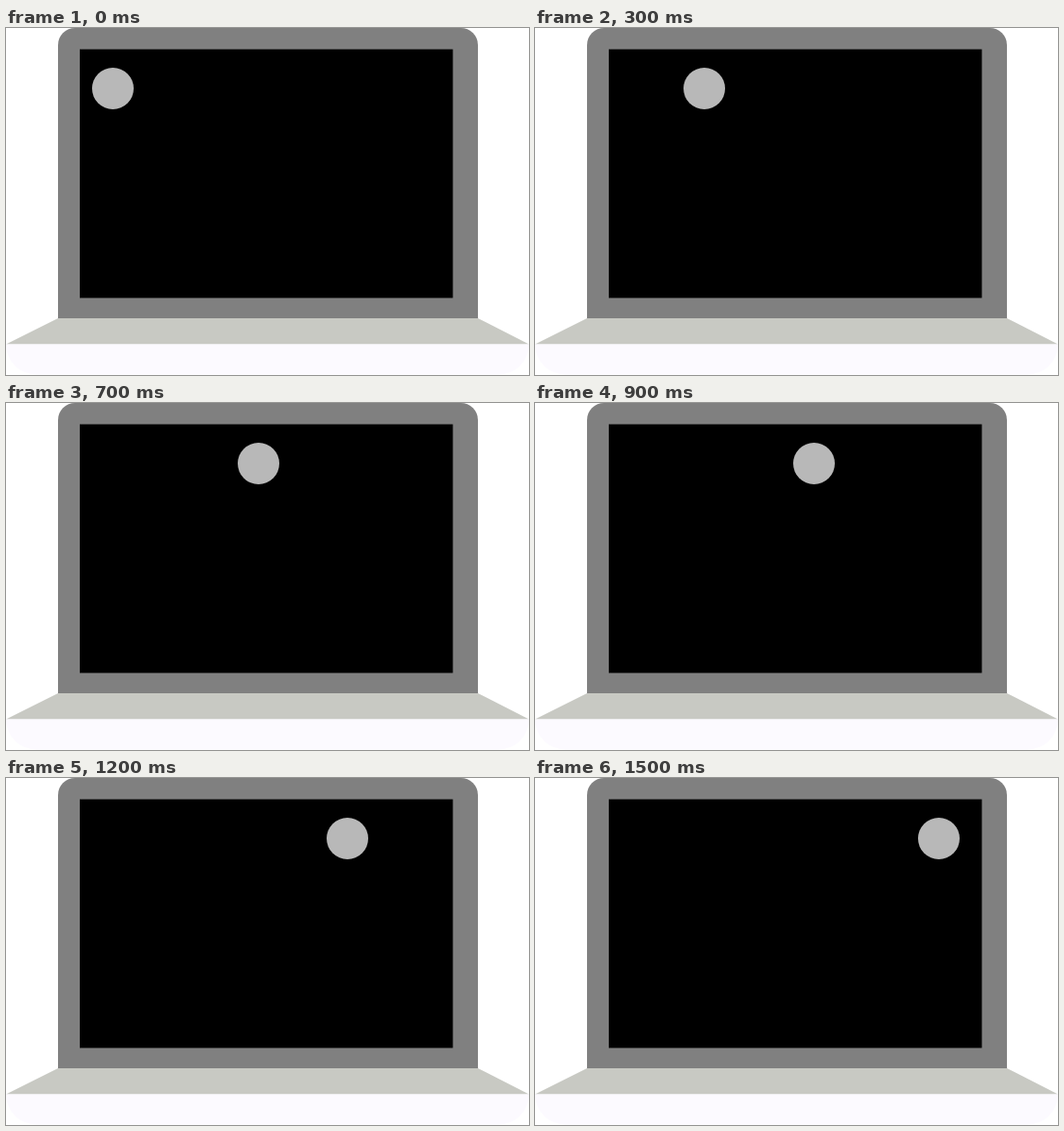
Animation, 553 px wide and 367 px high, one loop 1.6 s. Source, as an HTML page:

```html
<!DOCTYPE html>
<html lang="en">
<head>
<meta charset="utf-8">
<title>Laptop</title>
<style>
  html, body { margin: 0; width: 100%; height: 100%; overflow: hidden; background: #fff; }
  svg { display: block; width: 553px; height: 367px; }
</style>
</head>
<body>
<svg viewBox="0 0 553 367">
  <path fill="#808080" d="M55 307V18A18 18 0 0 1 73 0H481A18 18 0 0 1 499 18V307Z"/>
  <rect x="78" y="22.5" width="394.5" height="263"/>
  <path fill="#c8c9c3" d="M55 307H499L553 334.5H0Z"/>
  <path fill="#fcfaff" d="M0 334.5H553A32 32 0 0 1 521 366.5H32A32 32 0 0 1 0 334.5Z"/>
  <circle id="ball" cx="113" cy="64" r="22" fill="#b8b8b8"/>
</svg>
<script>
  const ball = document.getElementById('ball');
  const TICK = 100, STEPS = 16, STRIDE = 22;

  // Even strides, with one short stride of 6 halfway across.
  const ballX = i => 113 + STRIDE * i - (i >= 8 ? 16 : 0);

  const start = performance.now();
  function draw(now) {
    const i = Math.floor(Math.max(0, now - start) / TICK) % STEPS;
    ball.setAttribute('cx', ballX(i));
    requestAnimationFrame(draw);
  }
  draw(start);
</script>
</body>
</html>
```
